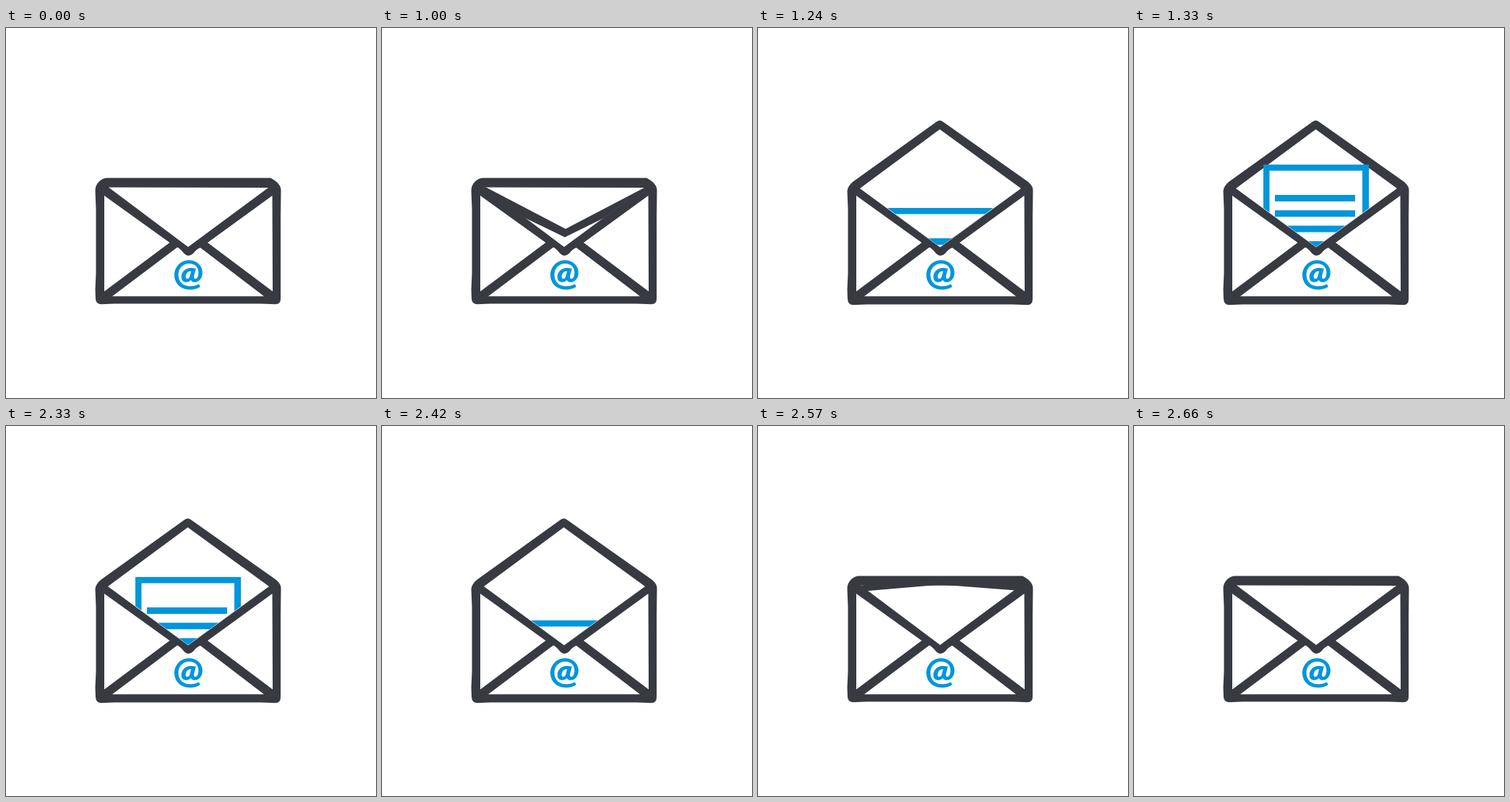
Write an HTML page with a canvas that moves like this. It is 512 px wide and 512 px high and loops after 2.69 s.

```html
<!DOCTYPE html>
<html lang="en">
<head>
<meta charset="utf-8">
<title>Envelope</title>
<style>
  html, body { margin: 0; width: 100%; height: 100%; overflow: hidden; background: #fff; }
  canvas { display: block; width: 512px; height: 512px; }
</style>
</head>
<body>
<canvas id="stage" width="512" height="512"></canvas>
<script>
const ctx = document.getElementById('stage').getContext('2d');
const DARK = '#383a42', BLUE = '#0096db', WHITE = '#fff';
const LOOP = 2690, STEP = 30, OPEN_AT = 1000, CLOSE_AT = 2330;
const CLOSED = -1, FULL = 11;

const fill = (path, color) => {
  ctx.fillStyle = color;
  ctx.fill(new Path2D(path));
};

// Panels of the envelope front: left, right and bottom.
const PANELS = `M136 232L226.5 297L136 364.5Z
  M368.5 232L279 297L369 364.5Z
  M147 371.3L237 303.5Q241 305 245.5 311Q252 318.5 259 312Q264 305.5 269 304L357 371.3Z`;

// Everything behind the front's V-shaped edge.
const BEHIND_FRONT = new Path2D('M124 208.5L141 221L252 303L364 221L381 208.5V90H124Z');

function drawBody(top, bottom) {
  fill(`M123.5 226${top}L380 265V345L380 375Q380 ${bottom} 373 ${bottom}
    L352 ${bottom - .8}H150L132 ${bottom}Q124.5 ${bottom} 124 375L123.5 362L124.5 340V250Z`, DARK);
  fill(PANELS, WHITE);
}

function drawFoldedFlap(apex) {
  drawBody('C123 215 132 208 139 207.5H366C372 210 380.5 217 380.5 224', 382.3);
  fill('M142 220.5L363 221L252 303Z', WHITE);
  if (apex === null) return;
  ctx.save();
  ctx.clip(BEHIND_FRONT);
  fill(`M130 220.5H144L254 ${apex - 5}L363 221H376V229
    L253 ${apex + 6.5}L130 230Z`, DARK);
  ctx.restore();
}

function drawOpenFlap(tip, shoulder, corner) {
  drawBody(`Q124 219 131 ${shoulder}L247 ${tip + 2}Q251.5 ${tip - 1.5} 256 ${tip + 2}
    L374 ${shoulder}Q380.5 219 380.5 224`, 383.3);
  fill(`M${corner} 222L251.5 ${tip + 12.5}L${505 - corner} 222L252 303.5Z`, WHITE);
}

function drawLetter(y) {
  ctx.save();
  ctx.clip(BEHIND_FRONT);
  fill(`M179 ${y}H325V400H179Z`, BLUE);
  fill(`M187.5 ${y + 8.5}H316V400H187.5Z`, WHITE);
  for (let i = 0; i < 4; i++) {
    const lineY = y + 42 + i * 21.3;
    fill(`M195 ${lineY}H306V${lineY + 9}H195Z`, BLUE);
  }
  ctx.restore();
}

function drawAtSign() {
  const setFont = size => { ctx.font = `900 ${size}px Lato, sans-serif`; };
  const measure = () => ctx.measureText('@');
  setFont(100);
  const probe = measure();
  setFont(100 * 41.5 / (probe.actualBoundingBoxAscent + probe.actualBoundingBoxDescent));
  const box = measure();
  ctx.fillStyle = BLUE;
  ctx.fillText('@',
    252 - (box.actualBoundingBoxRight - box.actualBoundingBoxLeft) / 2,
    341 + (box.actualBoundingBoxAscent - box.actualBoundingBoxDescent) / 2);
}

function stepAt(time) {
  if (time < OPEN_AT) return CLOSED;
  if (time < CLOSE_AT) return Math.min(FULL, Math.floor((time - OPEN_AT) / STEP));
  return Math.max(CLOSED, 10 - Math.floor((time - CLOSE_AT) / STEP));
}

function draw(step) {
  ctx.fillStyle = WHITE;
  ctx.fillRect(0, 0, 512, 512);
  if (step === CLOSED) drawFoldedFlap(null);
  else if (step < 3) drawFoldedFlap(283 - 35 * step);
  else if (step < 5) drawOpenFlap(step === 3 ? 172 : 138, 215, 143);
  else {
    drawOpenFlap(127.7, 213, 141);
    drawLetter(189 + 20 * (FULL - step));
  }
  drawAtSign();
}

const start = performance.now();
function frame() {
  draw(stepAt((performance.now() - start) % LOOP));
  requestAnimationFrame(frame);
}
frame();
</script>
</body>
</html>
```
